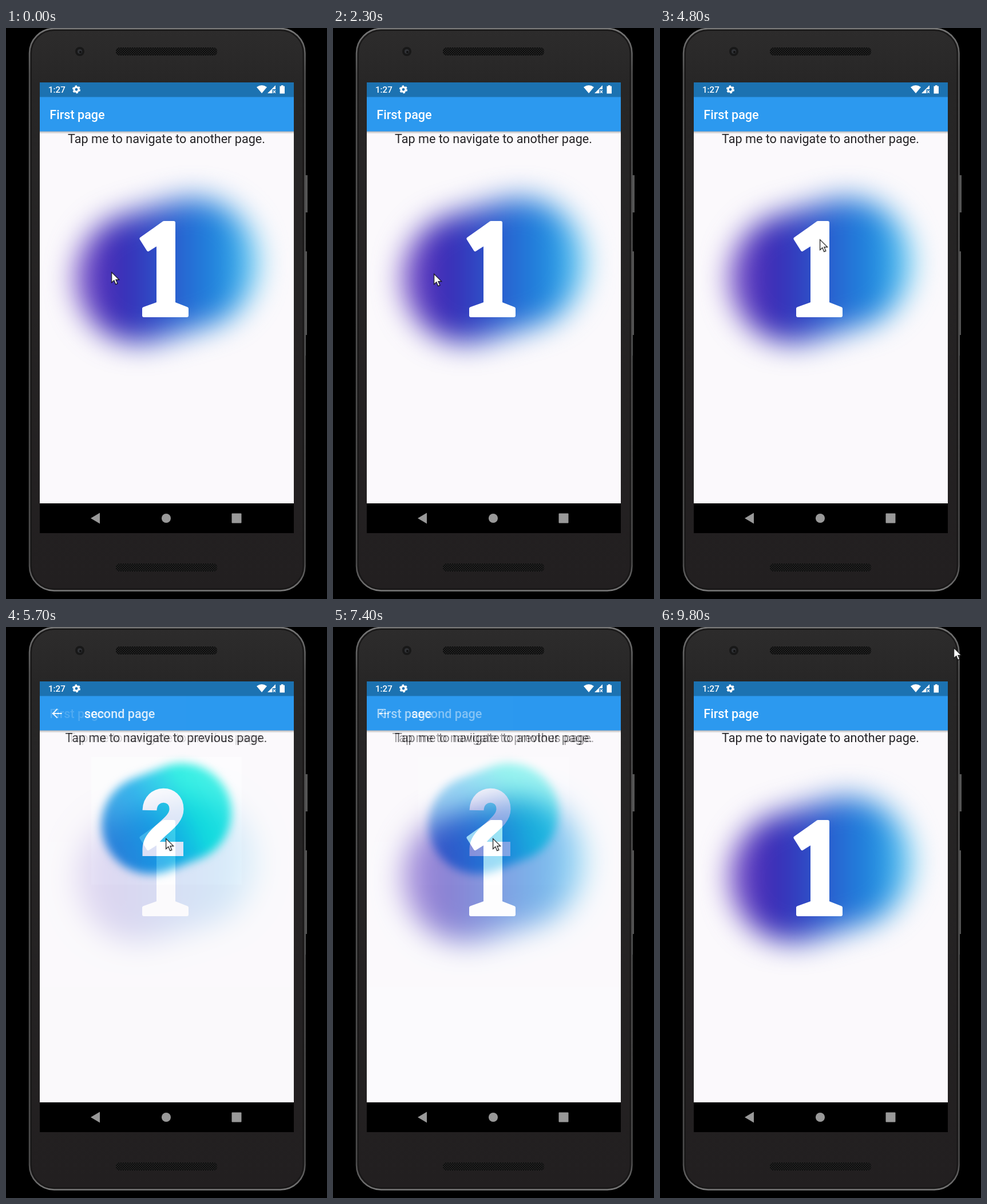
These frames come from a looping animation (561 px wide and 997 px high, 9900 ms). An HTML page:

```html
<!DOCTYPE html>
<html lang="en">
<head>
<meta charset="utf-8">
<title>Page fade transition</title>
<style>
  html, body { margin: 0; width: 100%; height: 100%; overflow: hidden; background: #000; }
  svg { display: block; width: 561px; height: 997px; }
  text { font-family: Roboto, "Liberation Sans", sans-serif; font-size: 21.6px; }
  .title { fill: #fff; font-weight: 500; }
  .clock { fill: #fff; font-weight: 500; font-size: 15.1px; }
  .hint { fill: #252427; text-anchor: middle; }
  .blob { fill: none; stroke-linecap: round; }
  .soft { filter: blur(25px); }
  .crisp { filter: blur(8px); }
  .second { opacity: 0; animation: fade 9.9s linear infinite; }
  .cursor { animation: point 9.9s ease-in-out infinite; }

  @keyframes fade {
    0%, 6.06% { opacity: 0; }
    12.12%, 16.16% { opacity: 1; }
    22.22%, 31.82% { opacity: 0; }
    37.88%, 42.42% { opacity: 1; }
    47.98%, 52.53% { opacity: 0; }
    58.59%, 61.62% { opacity: 1; }
    67.68%, 72.22% { opacity: 0; }
    78.28%, 87.37% { opacity: 1; }
    93.43%, 100% { opacity: 0; }
  }
  @keyframes point {
    0%, 20.2% { transform: translate(184px, 426px); }
    23.2%, 25.2% { transform: translate(176px, 429px); }
    31.8%, 39.4% { transform: translate(283px, 337px); }
    43.4%, 91.9% { transform: translate(279px, 369px); }
    94.9% { transform: translate(536px, 58px); }
    96.9%, 100% { transform: translate(513px, 36px); }
  }
</style>
</head>
<body>
<svg viewBox="0 0 561 997">
  <defs>
    <linearGradient id="body" x2="0" y2="1">
      <stop stop-color="#2d2c2c"/>
      <stop offset=".1" stop-color="#272626"/>
      <stop offset="1" stop-color="#221f20"/>
    </linearGradient>
    <linearGradient id="rim" x2="0" y2="1">
      <stop stop-color="#777"/>
      <stop offset=".08" stop-color="#515151"/>
      <stop offset=".95" stop-color="#4a4a4a"/>
      <stop offset="1" stop-color="#777"/>
    </linearGradient>
    <linearGradient id="shade" x2="0" y2="1">
      <stop stop-color="#000" stop-opacity=".3"/>
      <stop offset="1" stop-color="#000" stop-opacity="0"/>
    </linearGradient>
    <linearGradient id="indigo" gradientUnits="userSpaceOnUse" x1="110" y1="0" x2="450" y2="0">
      <stop stop-color="#8857cc"/>
      <stop offset=".24" stop-color="#3a27b4"/>
      <stop offset=".45" stop-color="#2f4dc6"/>
      <stop offset=".62" stop-color="#2570d6"/>
      <stop offset=".78" stop-color="#1e88de"/>
      <stop offset=".9" stop-color="#46b4ec"/>
      <stop offset="1" stop-color="#74def9"/>
    </linearGradient>
    <linearGradient id="teal" gradientUnits="userSpaceOnUse" x1="190" y1="385" x2="375" y2="300">
      <stop stop-color="#2493e2"/>
      <stop offset=".35" stop-color="#12a9e9"/>
      <stop offset=".58" stop-color="#10cde6"/>
      <stop offset=".75" stop-color="#0fecdf"/>
      <stop offset="1" stop-color="#22efe2"/>
    </linearGradient>
    <pattern id="mesh" width="4" height="4" patternUnits="userSpaceOnUse">
      <rect width="4" height="4" fill="#222"/>
      <circle cx="1" cy="1" r="1.1" fill="#080808"/>
      <circle cx="3" cy="3" r="1.1" fill="#080808"/>
    </pattern>
    <g id="bar">
      <rect x="59" y="120" width="444" height="710" fill="#fbf9fc"/>
      <rect x="59" y="180" width="444" height="5" fill="url(#shade)"/>
      <rect x="59" y="120" width="444" height="60.5" fill="#2c99ef"/>
    </g>
    <rect id="speaker" x="192" width="177" height="14" rx="6" fill="url(#mesh)"/>
  </defs>

  <rect width="561" height="997" fill="#000"/>

  <!-- phone -->
  <path d="M522 257h5v65h-5zM522 390h4v146h-2v36h-2z" fill="#555"/>
  <rect x="41" y="1" width="481.5" height="981.5" rx="43" fill="url(#body)" stroke="url(#rim)" stroke-width="2.5"/>
  <rect x="44" y="4" width="475.5" height="975.5" rx="40" fill="none" stroke="#181717" stroke-width="2"/>
  <use href="#speaker" y="34"/>
  <use href="#speaker" y="935"/>
  <circle cx="129" cy="41" r="8" fill="#181818"/>
  <circle cx="129" cy="41" r="4" fill="#303236"/>
  <circle cx="130" cy="42" r="2" fill="#111"/>

  <!-- pages -->
  <g>
    <use href="#bar"/>
    <text class="title" x="76.3" y="158.7">First page</text>
    <text class="hint" x="280.5" y="201.4">Tap me to navigate to another page.</text>
    <path class="blob soft" d="M234 437L327 410" stroke="url(#indigo)" stroke-width="226"/>
    <path d="M276 340H293V481L316 490V502H241V490L266 481V376L248.5 387L236.5 368Z"
      fill="#fff" stroke="#fff" stroke-width="6" stroke-linejoin="round"/>
  </g>
  <g class="second">
    <use href="#bar"/>
    <path transform="translate(76 138) scale(1.08)" fill="#fff"
      d="M20 11H7.83l5.59-5.59L12 4l-8 8 8 8 1.41-1.41L7.83 13H20z"/>
    <text class="title" x="136.8" y="158.7">second page</text>
    <text class="hint" x="280" y="201.4">Tap me to navigate to previous page.</text>
    <rect x="149" y="227" width="263" height="223" fill="#fdfdfe"/>
    <path class="blob crisp" d="M253 345L308 324" stroke="url(#teal)" stroke-width="172"/>
    <path d="M251 320C252 286 298 286 298 318C298 345 251 358 251 387.5H310"
      fill="none" stroke="#fff" stroke-width="25"/>
  </g>

  <!-- system bars -->
  <rect x="59" y="95" width="444" height="25.5" fill="#1c72b1"/>
  <text class="clock" x="74" y="113">1:27</text>
  <g fill="none" stroke="#fff">
    <circle cx="123" cy="107.3" r="4" stroke-width="3.2"/>
    <circle cx="123" cy="107.3" r="6.1" stroke-width="2" stroke-dasharray="3.4 2.99"/>
  </g>
  <g fill="#fff">
    <path d="M438 103.2Q447 96.8 456 103.2L447 114Z"/>
    <path d="M471 100V107H465.5V114H457Z"/>
    <path d="M467 109l4 4.5M471 109l-4 4.5" stroke="#fff" stroke-width="1.3"/>
    <path d="M478.5 101.5h2.5v-1.5h3.500v1.5h2.500v13h-8.500z"/>
  </g>
  <rect x="59" y="830" width="444" height="52" fill="#000"/>
  <g fill="#999">
    <path d="M148 856L164 846.500V865.500Z"/>
    <circle cx="280" cy="856" r="8"/>
    <rect x="394.500" y="847.500" width="17" height="17" rx="1"/>
  </g>

  <g class="cursor">
    <path transform="scale(1.08)" d="M.5 .5V17.200L4.400 13.500L7.100 19.900L10 18.700L7.300 12.400H12.600Z"
      fill="#fff" stroke="#111" stroke-width="1.1"/>
  </g>
</svg>
</body>
</html>
```
